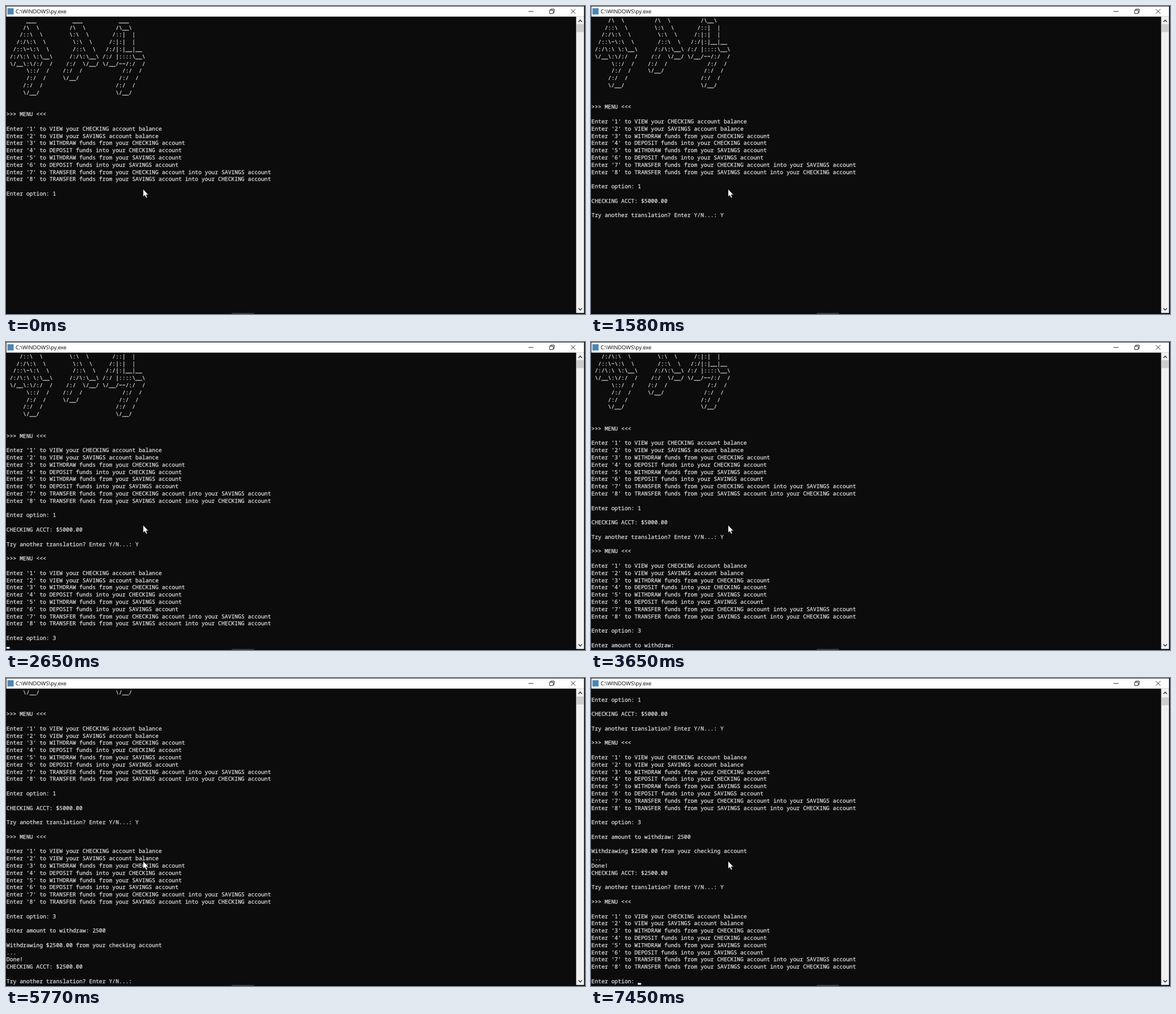
These frames come from a looping animation (1026x546 px, 8 s). An HTML page:

```html
<!DOCTYPE html>
<html lang="en">
<head>
<meta charset="utf-8">
<title>Console</title>
<style>
  html, body { margin: 0; width: 100%; height: 100%; overflow: hidden; background: #0c0c0c; }
  svg { display: block; }
  text { white-space: pre; text-rendering: geometricPrecision; }
  #screen text {
    font: 9.775px "Noto Sans Mono", "DejaVu Sans Mono", monospace;
    fill: #dedede; stroke: #dedede; stroke-width: .25;
  }
  .title { font: 9.5px "Open Sans", "Noto Sans", sans-serif; fill: #000; }
  .line { fill: none; stroke: #111; stroke-width: .9; }
  .chevron { fill: none; stroke: #404040; stroke-width: 1.6; }
</style>
</head>
<body>
<svg width="1026" height="546" viewBox="0 0 1026 546">
  <defs><clipPath id="view"><rect y="18.8" width="1010" height="526"/></clipPath></defs>
  <rect width="1026" height="546" fill="#0c0c0c"/>

  <g clip-path="url(#view)">
    <g id="screen"></g>
    <rect id="caret" width="5.86" height="3.2" fill="#f2f2f2"/>
  </g>

  <rect x="0.7" y="0.8" width="1023.6" height="18" fill="#fff"/>
  <rect x="2.5" y="4" width="11" height="11" fill="#4b86b8"/>
  <text class="title" x="17" y="13.4">C:\WINDOWS\py.exe</text>
  <path class="line" d="M926 9.6h8.6 M963.3 7.5h6.4v6h-6.4z M965 7.5v-2h6.4v6h-1.7 M1001 5.6l8 8 M1009 5.6l-8 8"/>

  <rect x="1010.3" y="18.8" width="14" height="525.4" fill="#f0f0f0"/>
  <rect id="thumb" x="1011" width="12.6" height="14" fill="#cdcdcd"/>
  <path class="chevron" d="M1014.4 28.2l3.1 -3.2 3.1 3.2 M1014.4 535.8l3.1 3.2 3.1 -3.2"/>
  <rect x="400" y="544" width="39" height="2" fill="#383838"/>

  <path d="M243 324.5v13.6l3-2.6 2.2 4.7 2.2-1-2.1-4.4h4z" fill="#fff" stroke="#000" stroke-width=".6"/>
</svg>
<script>
const LOOP = 8000, VISIBLE = 41;
const TOP = 19, ROW = 12.8, COL = 5.865, LEFT = 0.8, BASE = 9.7;
const BLINK = 530, PROMPT_HOLD = 860;

const logo = String.raw`
      ___           ___           ___
     /\  \         /\  \         /\__\
    /::\  \        \:\  \       /::|  |
   /:/\:\  \        \:\  \     /:|:|  |
  /::\~\:\  \       /::\  \   /:/|:|__|__
 /:/\:\ \:\__\     /:/\:\__\ /:/ |::::\__\
 \/__\:\/:/  /    /:/  \/__/ \/__/~~/:/  /
      \::/  /    /:/  /            /:/  /
      /:/  /     \/__/            /:/  /
     /:/  /                      /:/  /
     \/__/                       \/__/`.split("\n").slice(1);

const actions = [
  "VIEW your CHECKING account balance",
  "VIEW your SAVINGS account balance",
  "WITHDRAW funds from your CHECKING account",
  "DEPOSIT funds into your CHECKING account",
  "WITHDRAW funds from your SAVINGS account",
  "DEPOSIT funds into your SAVINGS account",
  "TRANSFER funds from your CHECKING account into your SAVINGS account",
  "TRANSFER funds from your SAVINGS account into your CHECKING account"
];
const menu = [
  "", ">>> MENU <<<", "",
  ...actions.map((action, i) => `Enter '${i + 1}' to ${action}`),
  "", "Enter option: "
];
const again = ["", "Try another translation? Enter Y/N...: "];

// Each cue edits the console and says how long the caret stays lit.
const cues = [];
const print = (at, ...rows) => cues.push({ at, hold: PROMPT_HOLD, edit: s => s.rows.push(...rows) });
const type = (at, text, gap = 0) => [...text].forEach((key, i) =>
  cues.push({ at: at + i * gap, hold: BLINK, typing: true, edit: s => s.rows.push(s.rows.pop() + key) }));
// The view makes room for the coming rows before they are drawn.
const enter = (at, room = 1) => cues.push({ at, hold: 0, edit: s => s.room = room });

print(0, ...logo, "", ...menu);
type(0, "1");
enter(0, 0);
print(130, "", "CHECKING ACCT: $5000.00");
print(190, ...again);
type(1250, "Y");
enter(1580, menu.length);
print(1650, ...menu);
type(2390, "3");
enter(2590);
print(2650, "");
print(2720, "Enter amount to withdraw: ");
type(3850, "2");
type(4110, "500", 90);
enter(4710);
print(4840, "");
print(4910, "Withdrawing $2500.00 from your checking account", "...", "Done!",
  "CHECKING ACCT: $2500.00", ...again);
type(7050, "Y");
enter(7380, menu.length);
print(7450, ...menu);

function consoleAt(t) {
  const state = { rows: [] };
  let last = {}, since = 0;
  for (const cue of cues.filter(c => c.at <= t)) {
    state.room = 0;
    cue.edit(state);
    if (!(cue.typing && last.typing)) since = cue.at;
    last = cue;
  }
  const overtime = t - since - last.hold;
  state.lit = overtime < 0 || Math.floor(overtime / BLINK) % 2 === 1;
  state.scroll = Math.max(0, state.rows.length + state.room - VISIBLE);
  return state;
}

const byId = id => document.getElementById(id);
const caret = byId("caret"), thumb = byId("thumb");
const slots = Array.from({ length: VISIBLE }, (_, i) => {
  const slot = document.createElementNS("http://www.w3.org/2000/svg", "text");
  slot.setAttribute("x", LEFT);
  slot.setAttribute("y", TOP + i * ROW + BASE);
  return byId("screen").appendChild(slot);
});

function draw(t) {
  const { rows, scroll, lit } = consoleAt(t);
  slots.forEach((slot, i) => {
    const text = rows[scroll + i] || "";
    if (slot.textContent !== text) slot.textContent = text;
  });
  const end = rows.length - 1;
  caret.setAttribute("x", LEFT + rows[end].length * COL);
  caret.setAttribute("y", TOP + (end - scroll) * ROW + 9.6);
  caret.setAttribute("visibility", lit ? "visible" : "hidden");
  thumb.setAttribute("y", 32.2 + 0.73 * Math.round(scroll / 8));
}

const start = performance.now();
function tick() {
  draw((performance.now() - start) % LOOP);
  requestAnimationFrame(tick);
}
tick();
</script>
</body>
</html>
```
